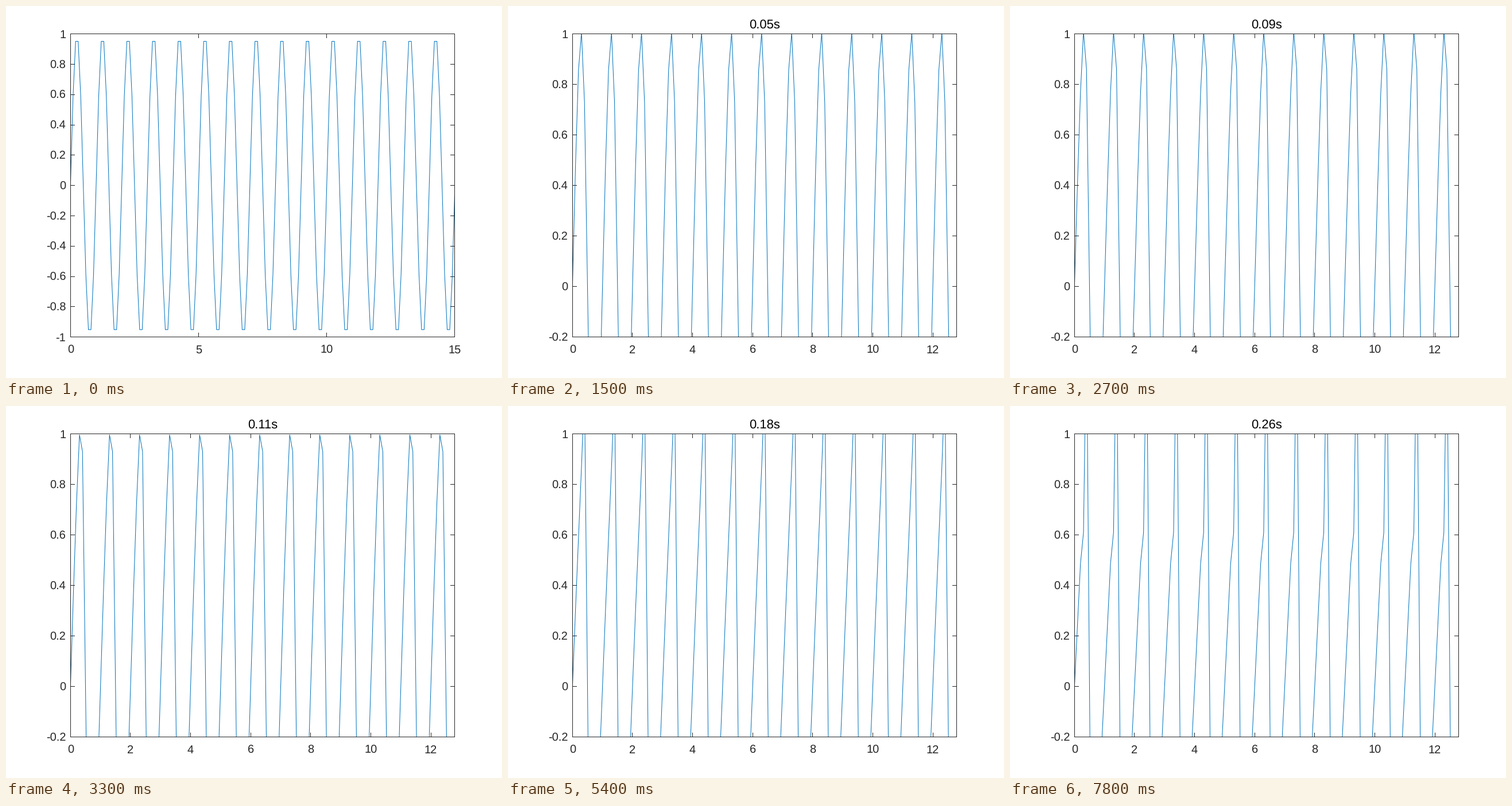
A matplotlib script for the animation above (8000 ms loop, 864x648 px).

```python
import math
import numpy as np
import matplotlib.pyplot as plt
from matplotlib.animation import FuncAnimation
from matplotlib.patches import Rectangle

# 72 dpi makes one point equal to one pixel.
W, H, DPI = 864, 648, 72
LEFT, RIGHT = 0.13 * W, 0.905 * W
TOP, BOTTOM = 0.075 * H, 0.89 * H
TICK = 0.01 * (RIGHT - LEFT)
BLUE, INK = (0, 0.447, 0.741), (0.15, 0.15, 0.15)
DX, DT, STEPS = 0.1, 0.01, 26
FRAMES, INTERVAL, HOLD = 80, 100, 3

plt.rcParams["font.family"] = "Liberation Sans"
plt.rcParams["text.hinting"] = "none"
plt.rcParams["path.simplify"] = False


def rate(u):
    """Time derivative of the inviscid Burgers equation, fluxes at midpoints."""
    mid = (u[1:] + u[:-1]) / 2
    du = np.zeros_like(u)
    du[1:-1] = -np.diff(mid * mid / 2) / DX
    return du


def advance(u):
    return u + DT * rate(u + DT / 2 * rate(u))


def make_stage(fig):
    """Axes over the whole figure, in pixels with y pointing down."""
    ax = fig.add_axes([0, 0, 1, 1])
    ax.set(xlim=(0, W), ylim=(H, 0))
    ax.axis("off")
    return ax


class View:
    def __init__(self, fig, xlim, ylim, xticks, yticks):
        self.ax, self.xlim, self.ylim = make_stage(fig), xlim, ylim
        left, right, top, bottom = map(math.floor, (LEFT, RIGHT, TOP, BOTTOM))
        self.line, = self.ax.plot([], [], color=BLUE, lw=1)
        self.line.set_clip_path(Rectangle(
            (left, top), right - left + 1, bottom - top + 1,
            transform=self.ax.transData))

        self.rule([left, right, right, left, left],
                  [top, top, bottom, bottom, top])
        size = round(TICK)
        for t in xticks:
            x = self.to_x(t)
            px = math.floor(x)
            self.rule([px, px], [top, top + size])
            self.rule([px, px], [bottom, bottom - size])
            self.label(x, 605, f"{t:g}", ha="center")
        for t in yticks:
            y = self.to_y(t)
            py = math.floor(y)
            self.rule([left, left + size], [py, py])
            self.rule([right, right - size], [py, py])
            self.label(LEFT - 8, y + 7, f"{t:g}", ha="right")

    def to_x(self, v):
        a, b = self.xlim
        return LEFT + (v - a) / (b - a) * (RIGHT - LEFT)

    def to_y(self, v):
        a, b = self.ylim
        return BOTTOM - (v - a) / (b - a) * (BOTTOM - TOP)

    def rule(self, xs, ys):
        self.ax.plot(xs, ys, color=INK, lw=1, snap=True,
                     solid_capstyle="projecting", solid_joinstyle="miter")

    def label(self, x, y, text, ha, size=20, color=INK):
        return self.ax.text(x, y, text, ha=ha, va="baseline",
                            fontsize=size, color=color)

    def show_curve(self, x, u):
        self.line.set_data(self.to_x(x), self.to_y(u))


x = np.arange(151) * DX
states = [np.sin(2 * np.pi * x)]
for _ in range(STEPS):
    states.append(advance(states[-1]))

fig = plt.figure(figsize=(W / DPI, H / DPI), dpi=DPI, facecolor="white")
start = View(fig, (0, 15), (-1, 1), range(0, 16, 5), np.arange(-5, 6) / 5)
run = View(fig, (0, 12.8), (-0.2, 1), range(0, 13, 2), np.arange(-1, 6) / 5)
start.show_curve(x, states[0])
title = run.label((LEFT + RIGHT) / 2, 39, "", "center", size=22, color="black")


def draw(frame):
    step = frame // HOLD
    start.ax.set_visible(step == 0)
    run.ax.set_visible(step > 0)
    run.show_curve(x, states[step])
    title.set_text(f"{step * DT:g}s")
    return start.ax, run.ax


anim = FuncAnimation(fig, draw, frames=FRAMES, interval=INTERVAL,
                     repeat=True, repeat_delay=0, blit=False)
plt.show()
```
